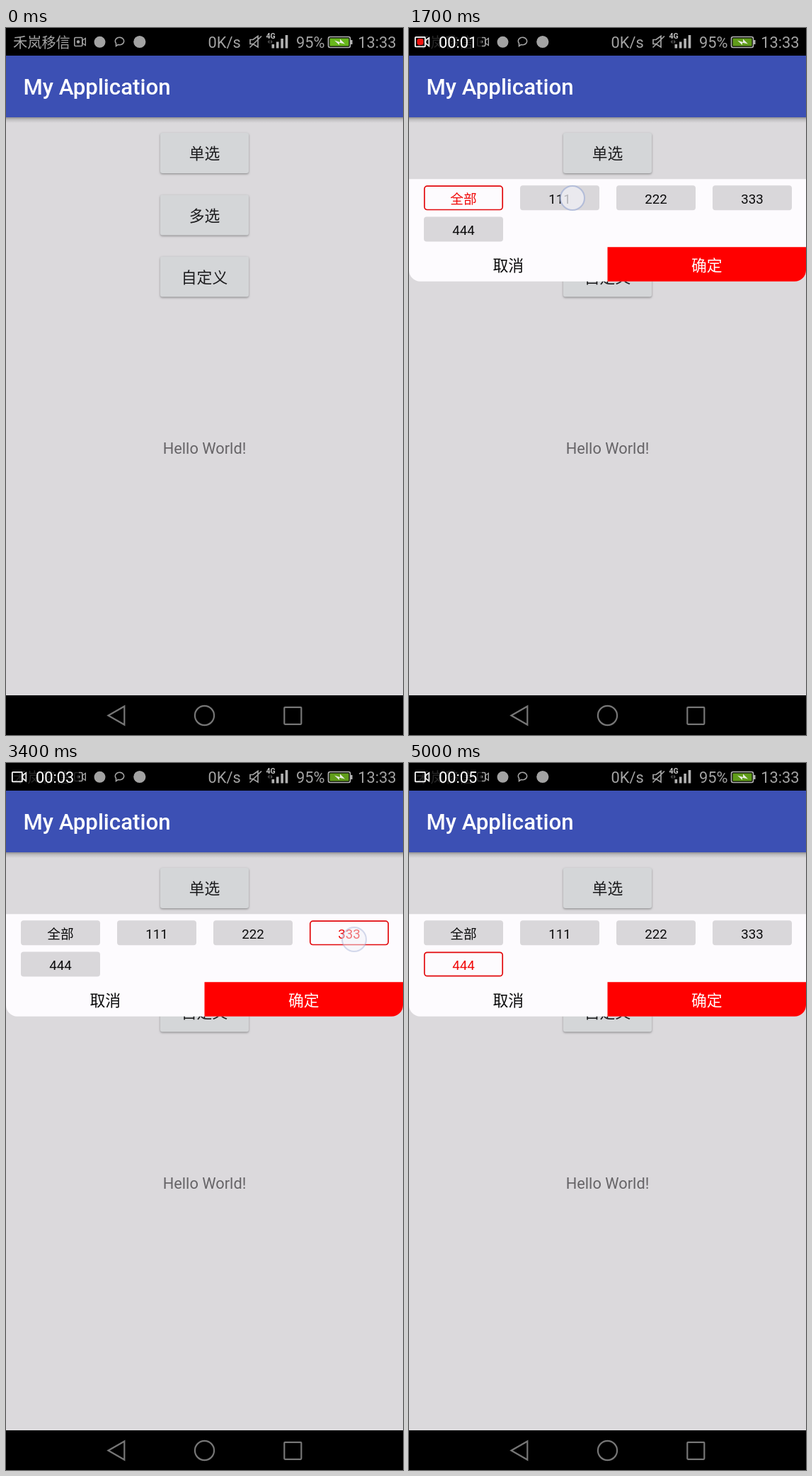
Write an HTML page with a canvas that moves like this. It is 561 px wide and 998 px high and loops after 5200 ms.

```html
<!DOCTYPE html>
<html lang="zh-CN">
<head>
<meta charset="utf-8">
<title>My Application</title>
<style>
html, body { margin: 0; width: 100%; height: 100%; overflow: hidden; background: #000; }
canvas { display: block; }
</style>
</head>
<body>
<canvas id="stage" width="561" height="998"></canvas>
<script>
const ctx = document.getElementById('stage').getContext('2d');
const LOOP = 5200, STEP = 100;
const FONT = 'Roboto, "Noto Sans CJK SC", "Noto Sans CJK", sans-serif';
const RED = '#ff0000', WHITE = '#fdfbfe', GREY = '#a3a3a3';

const CHIPS = ['全部', '111', '222', '333', '444'];
const TOUCHES = [
  { t: 700, x: 274, y: 172 },
  { t: 1700, x: 231, y: 240 },
  { t: 2600, x: 368, y: 248 },
  { t: 3200, x: 492, y: 249 },
  { t: 4300, x: 95, y: 286 }
];
const TICKS = [1200, 2000, 3000, 3900, 4900];
const BLINKS = [400, 700, 1200, 1700, 2000, 2200, 3000, 3500, 3900, 4400, 4900];

const clamp = v => Math.max(0, Math.min(1, v));
const countPast = (list, t) => list.filter(v => t >= v).length;

function rect(x, y, w, h, color) {
  ctx.fillStyle = color;
  ctx.fillRect(x, y, w, h);
}

function round(x, y, w, h, r, fill, line, width) {
  ctx.beginPath();
  ctx.roundRect(x, y, w, h, r);
  paint(fill, line, width);
}

function circle(x, y, r, fill, line, width) {
  ctx.beginPath();
  ctx.arc(x, y, r, 0, Math.PI * 2);
  paint(fill, line, width);
}

function poly(points, fill, line, width) {
  ctx.beginPath();
  points.forEach(([x, y]) => ctx.lineTo(x, y));
  ctx.closePath();
  paint(fill, line, width);
}

function paint(fill, line, width) {
  if (fill) { ctx.fillStyle = fill; ctx.fill(); }
  if (line) { ctx.strokeStyle = line; ctx.lineWidth = width; ctx.stroke(); }
}

function text(str, x, y, size, color, align = 'left', weight = 400) {
  ctx.font = `${weight} ${size}px ${FONT}`;
  ctx.textAlign = align;
  ctx.fillStyle = color;
  ctx.fillText(str, x, y);
}

function withShadow(color, blur, dy, draw) {
  ctx.save();
  ctx.shadowColor = color;
  ctx.shadowBlur = blur;
  ctx.shadowOffsetY = dy;
  draw();
  ctx.restore();
}

function button(label, y, lift) {
  withShadow(`rgba(0,0,0,${0.36 + lift * 0.1})`, 3 + lift * 5, 1.3 + lift * 1.7,
    () => round(218, y, 125, 57, 3, '#d4d6d8'));
  text(label, 280.5, y + 37, 21.8, '#1b1b1d', 'center', 500);
}

function mutedSpeaker() {
  ctx.beginPath();
  ctx.moveTo(345, 16.5);
  ctx.lineTo(349, 16.5);
  ctx.lineTo(356, 11.5);
  ctx.lineTo(356, 27);
  ctx.lineTo(349, 22.5);
  ctx.lineTo(345, 22.5);
  ctx.closePath();
  ctx.moveTo(344.5, 27.5);
  ctx.lineTo(361, 11.5);
  paint(null, GREY, 1.7);
}

function chatBubble() {
  ctx.beginPath();
  ctx.ellipse(160.5, 18.5, 6.2, 5.2, 0, Math.PI * 0.8, Math.PI * 2.6);
  ctx.lineTo(155.5, 25.5);
  ctx.closePath();
  paint(null, GREY, 1.6);
}

function battery(t) {
  round(455.5, 12.5, 31, 15, 2.5, '#000', '#b4b4b4', 1.6);
  rect(487, 17, 2.5, 6, '#b4b4b4');
  rect(457.5, 14.5, 27, 11, t < 200 ? '#68b71c' : '#609c1a');
  poly([[464, 17.5], [472, 20], [472, 15.5], [479, 22.5], [471, 20.8], [471, 24]], '#e8ede2');
}

function statusBar(t) {
  rect(0, 0, 561, 39, '#000');
  text('禾岚移信', 10, 27.6, 20.2, GREY);

  round(96.8, 13.5, 11, 12, 1.5, null, GREY, 1.6);
  circle(102, 19.5, 2.2, GREY);
  poly([[108, 17.5], [112.3, 14.5], [112.3, 24.5], [108, 21.5]], null, GREY, 1.4);
  circle(132.5, 19.8, 8, GREY);
  chatBubble();
  circle(188.8, 19.5, 8.6, GREY);

  text('0K/s', 285.5, 28, 21.8, GREY);
  mutedSpeaker();
  text('4G', 367.5, 15, 10.5, '#c4c4c4', 'left', 700);
  poly([[369.5, 19.5], [372.5, 16.5], [372.5, 22.5]], '#4c4c4c');
  poly([[374, 16.5], [377, 19.5], [374, 22.5]], '#4c4c4c');
  [5.5, 9, 13.5, 18.5].forEach((h, i) => rect(375.5 + i * 6.4, 28.5 - h, 3.6, h, '#b2b2b2'));
  text('95%', 410, 28, 21.8, GREY);
  battery(t);
  text('13:33', 551.5, 28, 21.8, GREY, 'right');
}

function recorder(t) {
  const shown = clamp(t / 200);
  if (!shown) return;
  ctx.save();
  ctx.globalAlpha = shown;
  rect(7, 9, 96, 22, 'rgba(0,0,0,.76)');
  round(8.8, 12.8, 14, 13.6, 1, null, '#fff', 1.8);
  poly([[23.5, 17.5], [28.3, 13.8], [28.3, 25.4], [23.5, 21.7]], null, '#fff', 1.6);
  if (countPast(BLINKS, t) % 2 === 0) round(11.3, 15, 9, 9, 3, '#f01410');
  text('00:0' + countPast(TICKS, t), 42, 28, 21.8, '#fff');
  ctx.restore();
}

function toolbar() {
  const fade = ctx.createLinearGradient(0, 126, 0, 134);
  fade.addColorStop(0, 'rgba(0,0,0,.34)');
  fade.addColorStop(0.4, 'rgba(0,0,0,.13)');
  fade.addColorStop(1, 'rgba(0,0,0,0)');
  rect(0, 126, 561, 8, fade);
  rect(0, 39, 561, 87, '#3c50b4');
  text('My Application', 24.5, 94.3, 31.2, '#fff', 'left', 500);
}

function navBar() {
  rect(0, 942, 561, 56, '#000');
  const line = '#767676';
  poly([[144.5, 970.5], [167.3, 957.5], [167.3, 983.5]], null, line, 2.2);
  circle(280.5, 970.5, 13.6, null, line, 2.2);
  round(393.3, 958.8, 24, 24, 1, null, line, 2.2);
}

function chip(i, active) {
  const x = 21 + (i % 4) * 136, y = i < 4 ? 222.3 : 266.5;
  if (active) round(x + 0.8, y + 0.8, 110.4, 33.4, 4, WHITE, '#e2090c', 1.7);
  else round(x, y, 112, 35, 4, '#d9d7da');
  text(CHIPS[i], x + 56, y + 25.3, 18.7, active ? '#f00808' : '#0b0b0c', 'center');
}

function popup(t) {
  const shown = clamp((t - 1000) / 400);
  if (!shown) return;
  const picked = TOUCHES.reduce((n, p, i) => t >= p.t + 200 ? i : n, 0);
  ctx.save();
  ctx.globalAlpha = 1 - (1 - shown) ** 2;
  round(0, 213.3, 561, 144.5, [0, 0, 16, 16], WHITE);
  round(280.5, 309.3, 280.5, 48.5, [0, 0, 16, 0], RED);
  CHIPS.forEach((_, i) => chip(i, i === picked));
  text('取消', 140.3, 342.8, 21.8, '#0b0b0c', 'center');
  text('确定', 420.8, 342.8, 21.8, '#fff', 'center');
  ctx.restore();
}

function touches(t) {
  for (const p of TOUCHES) {
    const age = t - p.t;
    if (age < 0 || age >= 500) continue;
    ctx.save();
    ctx.globalAlpha = age < 200 ? 1 : clamp((450 - age) / 400);
    circle(p.x, p.y, 17, 'rgba(240,240,246,.74)', 'rgba(160,174,212,.7)', 2);
    ctx.restore();
  }
}

function draw(t) {
  rect(0, 0, 561, 998, '#dbd9dc');
  toolbar();
  const lift = t < 700 ? 0 : Math.min(clamp((t - 650) / 200), clamp((1400 - t) / 300));
  button('单选', 148, lift);
  button('多选', 235.5, 0);
  button('自定义', 322.5, 0);
  text('Hello World!', 280.5, 601, 21.8, '#666467', 'center');
  popup(t);
  statusBar(t);
  recorder(t);
  navBar();
  touches(t);
}

const start = performance.now();
function frame() {
  const t = (performance.now() - start) % LOOP;
  draw(Math.floor(t / STEP) * STEP);
  requestAnimationFrame(frame);
}
frame();
</script>
</body>
</html>
```
